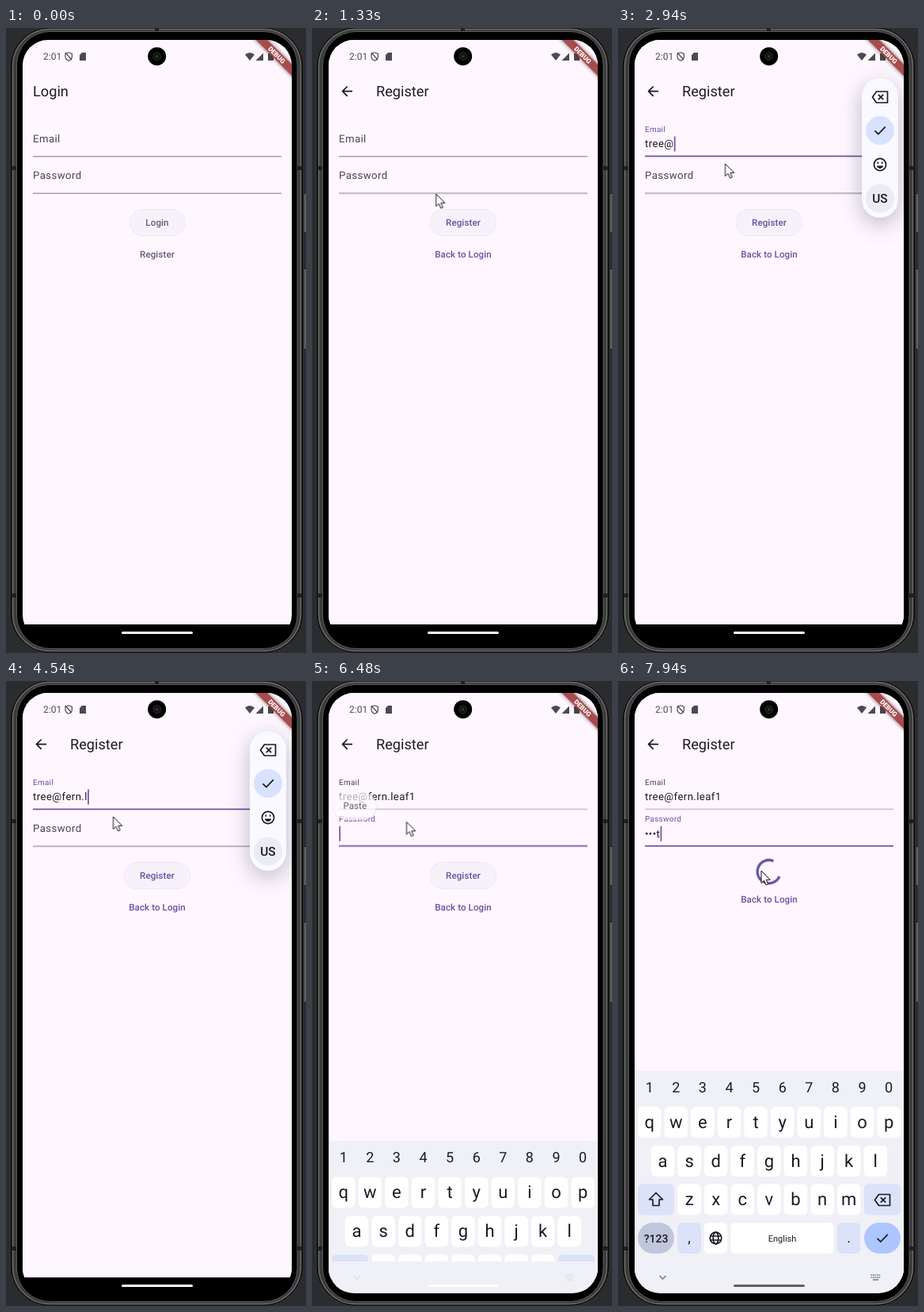
Write an HTML page that moves like this. It is 379 px wide and 787 px high and loops after 8 s.

```html
<!DOCTYPE html>
<html lang="en">
<head>
<meta charset="utf-8">
<title>Register screen</title>
<style>
html, body { margin: 0; width: 100%; height: 100%; overflow: hidden; background: #2b2c2f; }
svg { display: block; width: 100vw; height: 100vh; font-family: Roboto, sans-serif; text-rendering: geometricPrecision; }
.title { font-size: 18.2px; fill: #1d1b20; }
.body { font-size: 13.2px; letter-spacing: .41px; fill: #1d1b20; white-space: pre; }
.label { fill: #49454f; transform-origin: 34px 143.6px; }
.line { fill: #6b6770; y: 161.4px; height: .9px; }
.action { font-size: 11.6px; font-weight: 500; letter-spacing: .08px; text-anchor: middle; fill: #625a7a; }
#register .action { fill: #6750a4; }
.pill { fill: #f7f2fa; filter: drop-shadow(0 .8px .6px rgba(0,0,0,.25)); }
.stroke { fill: none; stroke: #1a1b20; stroke-width: 1.7; stroke-linejoin: round; }
.mid { text-anchor: middle; fill: #1a1b20; }
.page { transform-origin: 191px 383px; }

.move { animation: 8s linear infinite; }
#login { animation-name: leave; }
#scrim { animation-name: scrim; }
#register { animation-name: enter, appear; }
#emailLabel { animation-name: emailLabel; }
#emailLine { animation-name: emailLine; }
#passLabel { animation-name: passLabel; }
#passLine { animation-name: passLine; }
#paste { animation-name: paste, pasteSpot; }
#toolbar { animation-name: toolbar, toolbarSlide; filter: drop-shadow(0 8px 14px rgba(40,40,60,.3)); }
#keyboard { animation-name: slideUp; }
#navLight { animation-name: navLight; }
#navIcons { animation-name: navLight, navIcons; }
#navPill { animation-name: navPill; }
#mouse { animation-name: mouse, mouseIn; }
#click { animation-name: click; animation-timing-function: step-end; }
#submit { animation-name: submit; }
#back { animation-name: back; }
#spinner { animation-name: spinIn; }
#arc { animation-name: spin, sweep; transform-origin: 190.7px 240.1px; }

@keyframes leave {
  0%, 11.06% { transform: scale(1); animation-timing-function: cubic-bezier(.3,0,.8,.15); }
  11.69% { transform: scale(1.02); animation-timing-function: cubic-bezier(.05,.7,.1,1); }
  14.81%, 100% { transform: scale(1.05); }
}
@keyframes enter {
  0%, 11.06% { transform: scale(.85); animation-timing-function: cubic-bezier(.3,0,.8,.15); }
  11.69% { transform: scale(.91); animation-timing-function: cubic-bezier(.05,.7,.1,1); }
  14.81%, 100% { transform: scale(1); }
}
@keyframes appear { 0%, 11.51% { opacity: 0; } 11.81%, 100% { opacity: 1; } }
@keyframes scrim { 0%, 11.69% { opacity: 0; } 12.5%, 100% { opacity: .6; } }
@keyframes emailLabel {
  0%, 19.75% { transform: none; fill: #49454f; animation-timing-function: cubic-bezier(.4,0,.2,1); }
  21.9%, 76.25% { transform: translateY(-12.5px) scale(.75); fill: #6750a4; }
  78.4%, 100% { transform: translateY(-12.5px) scale(.75); fill: #49454f; }
}
@keyframes passLabel {
  0%, 76.25% { transform: none; fill: #49454f; animation-timing-function: cubic-bezier(.4,0,.2,1); }
  78.4%, 100% { transform: translateY(-12.5px) scale(.75); fill: #6750a4; }
}
@keyframes emailLine {
  0%, 19.75% { fill: #6b6770; y: 161.4px; height: .9px; }
  21.9%, 76.25% { fill: #6750a4; y: 160.6px; height: 1.7px; }
  78.4%, 100% { fill: #cbc5d0; y: 160.6px; height: 1.7px; }
}
@keyframes passLine {
  0%, 76.25% { fill: #6b6770; y: 161.4px; height: .9px; }
  78.4%, 100% { fill: #6750a4; y: 160.6px; height: 1.7px; }
}
@keyframes paste {
  0%, 21.9% { opacity: 0; }
  23.75%, 26% { opacity: 1; }
  27.8%, 80% { opacity: 0; }
  81.5%, 82.4% { opacity: 1; }
  84.2%, 100% { opacity: 0; }
}
@keyframes pasteSpot { 0%, 50% { transform: none; } 50.01%, 100% { transform: translateY(46.3px); } }
@keyframes toolbar { 0%, 21.4% { opacity: 0; } 22%, 79.5% { opacity: 1; } 80.2%, 100% { opacity: 0; } }
@keyframes toolbarSlide {
  0%, 25.2% { transform: translateX(-8px); animation-timing-function: ease-out; }
  28.5%, 100% { transform: none; }
}
@keyframes slideUp {
  0%, 80.08% { transform: translateY(240px); animation-timing-function: cubic-bezier(0,0,.2,1); }
  83.3%, 100% { transform: none; }
}
@keyframes navLight { 0%, 80% { opacity: 0; } 80.3%, 100% { opacity: 1; } }
@keyframes navPill { 0%, 85% { fill: #fff; } 87%, 100% { fill: #606067; } }
@keyframes navIcons { 0%, 90.9% { stroke: #dddde4; } 92.5%, 100% { stroke: #73737c; } }
@keyframes mouse {
  0%, 4.12% { transform: translate(255px,350px); animation-timing-function: ease-out; }
  8.75%, 14.9% { transform: translate(199.5px,289.5px); animation-timing-function: ease-in-out; }
  18%, 25.1% { transform: translate(128.5px,156px); animation-timing-function: ease-in-out; }
  28%, 70.1% { transform: translate(135.5px,171px); animation-timing-function: ease-in-out; }
  73.5%, 77% { transform: translate(110px,172px); animation-timing-function: ease-in-out; }
  80.5%, 86% { transform: translate(119.5px,177.5px); animation-timing-function: ease-in-out; }
  90.5%, 100% { transform: translate(181px,239px); }
}
@keyframes mouseIn { 0%, 4.12% { opacity: 0; } 4.13%, 100% { opacity: 1; } }
@keyframes click {
  0% { opacity: 0; } 9.9% { opacity: 1; } 11% { opacity: 0; }
  18.5% { opacity: 1; } 19.75% { opacity: 0; }
  20.6% { opacity: 1; } 21.7% { opacity: 0; }
  73.8% { opacity: 1; } 76.2% { opacity: 0; }
  91.2% { opacity: 1; } 92.8%, 100% { opacity: 0; }
}
@keyframes submit { 0%, 92.99% { opacity: 1; } 93%, 100% { opacity: 0; } }
@keyframes back { 0%, 92.99% { transform: none; } 93%, 100% { transform: translateY(-10px); } }
@keyframes spinIn { 0%, 92.99% { opacity: 0; } 93%, 100% { opacity: 1; } }
@keyframes spin { 0%, 93% { transform: rotate(-90deg); } 100% { transform: rotate(38deg); } }
@keyframes sweep {
  0%, 93% { stroke-dasharray: 0 360; animation-timing-function: cubic-bezier(.4,0,.2,1); }
  100% { stroke-dasharray: 270 360; }
}
</style>
</head>
<body>
<svg viewBox="0 0 379 787" preserveAspectRatio="none">
  <defs>
    <clipPath id="screen"><rect x="21" y="15" width="340" height="756" rx="32"/></clipPath>
    <clipPath id="pageArea"><rect x="21" y="15" width="340" height="736"/></clipPath>
    <clipPath id="aboveNav"><rect x="21" y="15" width="340" height="716"/></clipPath>
    <g id="erase" class="stroke"><path d="M-9.5 0L-4.5-7H9.5V7H-4.5Z"/><path d="M-2.2-3.2L4.2 3.2M4.2-3.2L-2.2 3.2"/></g>
    <path id="check" class="stroke" d="M-6.5 .3L-2.2 4.6 6.8-4.6"/>
  </defs>

  <!-- phone body -->
  <rect width="379" height="787" fill="#2b2c2f"/>
  <g fill="#606061" stroke="#222">
    <rect x="376" y="208.5" width="6" height="49"/>
    <rect x="376" y="303.5" width="6" height="101"/>
  </g>
  <rect x="6.5" y="0" width="368" height="786" rx="49" fill="#101010" stroke="#0a0a0a"/>
  <rect x="8.5" y="1.5" width="364" height="783" rx="47" fill="#3b3b3b" stroke="#6c6c6c" stroke-width="1.5"/>
  <rect x="13.5" y="4.5" width="354.5" height="777" rx="42" stroke="#5a5a5a"/>
  <path d="M8 176.5h5M8 714.5h5M368 176.5h5M368 714.5h5M190.5 1v3" stroke="#1e1e1e" stroke-width="5"/>

  <g clip-path="url(#screen)">
    <g clip-path="url(#pageArea)">
      <g id="login" class="page move"></g>
      <rect id="scrim" class="move" x="21" y="15" width="340" height="736"/>
      <g id="register" class="page move"></g>
    </g>
    <g id="paste" class="move">
      <rect x="27.5" y="93" width="53.5" height="36" rx="18" fill="#fffbff" filter="drop-shadow(0 1px 1px rgba(0,0,0,.15))"/>
      <text x="54.3" y="115" class="mid" font-size="11.6">Paste</text>
    </g>
    <g clip-path="url(#aboveNav)"><g id="keyboard" class="move"></g></g>
    <rect id="navLight" class="move" x="21" y="731" width="340" height="40" fill="#f0f0f7"/>
    <g id="navIcons" class="move" fill="none" stroke-width="1.4">
      <path d="M52.5 749l4 4 4-4M322 754h7"/>
      <path d="M319.5 748h12M319.5 751h12" stroke-dasharray="1.7 .8"/>
    </g>
    <rect id="navPill" class="move" x="146" y="760" width="90" height="3" rx="1.5"/>

    <g id="toolbar" class="move">
      <rect x="308" y="63" width="46" height="176" rx="23" fill="#f9f9ff"/>
      <use href="#erase" x="331" y="87"/>
      <circle cx="331" cy="129" r="18" fill="#d8e2ff"/>
      <use href="#check" x="331" y="129"/>
      <g class="stroke">
        <circle cx="331" cy="172" r="7.6"/>
        <path d="M327 174q4 5 8 0z" fill="#1a1b20" stroke-width="1"/>
        <path d="M328.3 168.5v2.2M333.7 168.5v2.2"/>
      </g>
      <circle cx="331" cy="214.5" r="18" fill="#ebebf2"/>
      <text x="331" y="220" class="mid" font-size="15.5" font-weight="500">US</text>
    </g>

    <!-- status bar -->
    <g fill="#4c4a50">
      <text x="47" y="40.2" font-size="12">2:01</text>
      <path d="M75 32.5l4.2-1.7 4.2 1.7v3.5q0 3.5-4.2 5.2-4.2-1.7-4.2-5.2zM75 31l8 9" fill="none" stroke="#4c4a50" stroke-width="1.2"/>
      <path d="M96 31h5v10h-8v-7z"/>
      <path d="M302 33.5q6-5 12 0l-6 7.5z"/>
      <path d="M315.5 41h9.5v-9.5z"/>
      <path d="M331 32h2v-1h3v1h2v9h-7z"/>
    </g>
    <g transform="translate(342 34) rotate(45)">
      <rect x="-44" y="-5.2" width="88" height="10.4" fill="#a84b4c" filter="drop-shadow(0 0 2.5px rgba(0,0,0,.5))"/>
      <text y="3" text-anchor="middle" font-size="8.4" font-weight="900" fill="#fff">DEBUG</text>
    </g>
    <circle cx="190.7" cy="35.7" r="11.5"/>
    <circle cx="190.7" cy="35.7" r="5" fill="#151515" stroke="#292929"/>
    <circle cx="190.7" cy="35.7" r="1.5" fill="#3a3a3a"/>

    <g id="mouse" class="move">
      <circle id="click" class="move" r="12" fill="#fff200" fill-opacity=".55"/>
      <path d="M0 0V15.5L3.6 12.2 6.1 18 8.7 16.9 6.3 11.3H11.2Z" fill="#fff" stroke="#111"/>
    </g>
  </g>
</svg>

<script>
const $ = id => document.getElementById(id);
const LOOP = 8000, LEFT = 34;

const field = (label, dy, id) => `<g transform="translate(0 ${dy})">
  <text id="${id}Label" class="body label move" x="${LEFT}" y="143.6">${label}</text>
  <rect id="${id}Line" class="line move" x="${LEFT}" width="314"/>
  <text id="${id}Text" class="body" x="${LEFT}" y="150.4"></text>
  <rect id="${id}Caret" x="${LEFT}" y="136.5" width="1.65" height="19" fill="#6750a4" opacity="0"/></g>`;
const button = (label, width) =>
  `<rect class="pill" x="${191 - width / 2}" y="228.5" width="${width}" height="33.2" rx="16.6"/>
  <text class="action" x="191" y="249.3">${label}</text>`;
const link = label => `<text class="action" x="191" y="289.2">${label}</text>`;
const title = (label, x) =>
  `<rect x="21" y="15" width="340" height="736" fill="#fef7ff"/><text class="title" x="${x}" y="85.7">${label}</text>`;

$('login').innerHTML = title('Login', LEFT) + field('Email', 0, 'loginEmail') +
  field('Password', 46.3, 'loginPass') + button('Login', 70) + link('Register');

$('register').innerHTML = title('Register', 81) +
  '<path class="stroke" d="M51 79.7H39M44.7 73.5L38.5 79.7 44.7 85.9" stroke-linejoin="miter"/>' +
  field('Email', 0, 'email') + field('Password', 46.3, 'pass') +
  `<g id="submit" class="move">${button('Register', 84)}</g><g id="back" class="move">${link('Back to Login')}</g>
  <g id="spinner" class="move"><circle id="arc" class="move" cx="190.7" cy="240.1" r="14.6" pathLength="360"
    fill="none" stroke="#6750a4" stroke-width="3.3"/></g>`;

// Keyboard
const PITCH = 33.6, TINT = '#dbe2f9';
const key = (x, y, w, fill = '#fff', r = 6) =>
  `<rect x="${x - w / 2}" y="${y - 19.5}" width="${w}" height="39" rx="${r}" fill="${fill}"/>`;
const glyph = (s, x, y, size, extra = '') =>
  `<text class="mid" x="${x}" y="${y}" font-size="${size}" ${extra}>${s}</text>`;
const row = (chars, x, y) => [...chars].map((c, i) =>
  key(x + i * PITCH, y, 29.5) + glyph(c, x + i * PITCH, y + 7, 22)).join('');

$('keyboard').innerHTML = '<rect x="21" y="491" width="340" height="280" fill="#f0f0f7"/>' +
  [...'1234567890'].map((c, i) => glyph(c, 39.7 + i * PITCH, 518, 18)).join('') +
  row('qwertyuiop', 39.7, 555.5) + row('asdfghjkl', 56.5, 604.5) + row('zxcvbnm', 90.1, 653) +
  key(48, 653, 46, TINT) + key(334, 653, 46, TINT) +
  '<path class="stroke" d="M48 644.5l8.5 8.5h-4.5v7.5h-8v-7.5h-4.5z"/><use href="#erase" x="334" y="653.5"/>' +
  key(48, 701.5, 46, '#c0c6dc', 19.5) + glyph('?123', 48, 706.5, 14, 'font-weight="500"') +
  key(90, 701.5, 29.5, TINT) + glyph(',', 90, 707, 18) +
  key(123.5, 701.5, 29.5) +
  `<g class="stroke"><circle cx="123.5" cy="701.5" r="7.3"/>
    <ellipse cx="123.5" cy="701.5" rx="3.3" ry="7.3"/><path d="M117 699h13M117 704h13"/></g>` +
  key(207.5, 701.5, 130) + glyph('English', 207.5, 705.5, 11) +
  key(291.5, 701.5, 29.5, TINT) + glyph('.', 291.5, 707, 18) +
  key(334, 701.5, 46, '#adc6ff', 19.5) + '<use href="#check" x="334" y="701.5"/>';

// Typing: each key has its own moment; the caret restarts its blink on every key
const inputs = [
  { id: 'email', value: 'tree@fern.leaf1', focus: 1580, blur: 6100, show: s => s,
    keys: [2080, 2180, 2290, 2440, 2940, 3140, 3280, 3380, 3470, 4410, 4510, 4600, 4740, 4810, 5070] },
  { id: 'pass', value: 'test', focus: 6100, blur: LOOP, keys: [6590, 6700, 6810, 6920],
    show: s => '•'.repeat(Math.max(0, s.length - 1)) + s.slice(-1) }
];

function type({ id, value, focus, blur, keys, show }, t) {
  const count = keys.filter(k => k <= t).length;
  const text = $(id + 'Text'), caret = $(id + 'Caret');
  const content = show(value.slice(0, count));
  if (text.textContent !== content) text.textContent = content;
  const since = t - (count ? keys[count - 1] : focus);
  const on = t >= focus && t < blur && since % 1000 < 500;
  caret.setAttribute('x', LEFT + .3 + (count ? text.getComputedTextLength() : 0));
  caret.setAttribute('opacity', on ? 1 : 0);
}

let start;
function frame(now) {
  start ??= now;
  const t = (now - start) % LOOP;
  inputs.forEach(input => type(input, t));
  requestAnimationFrame(frame);
}
requestAnimationFrame(frame);
</script>
</body>
</html>
```
